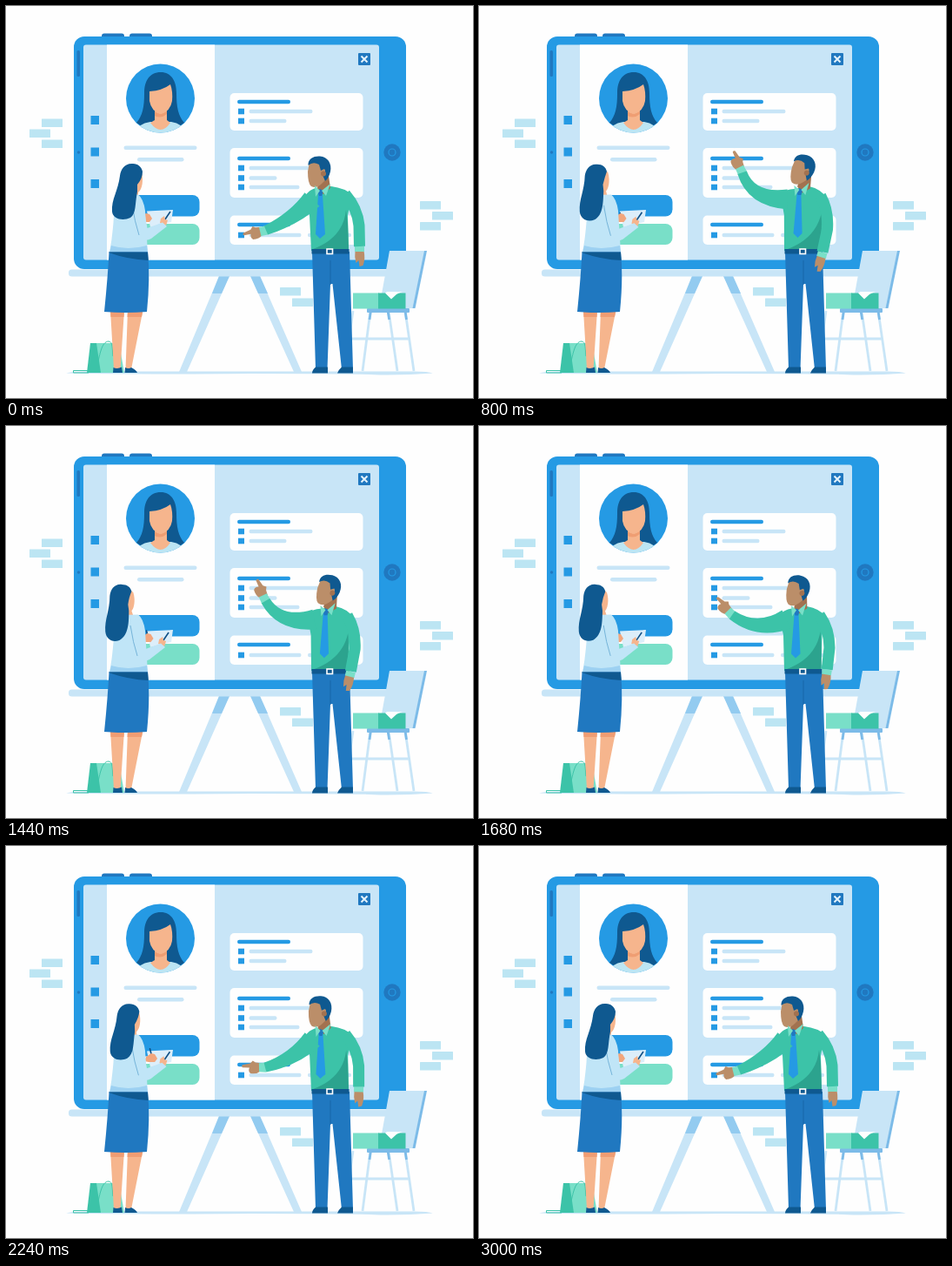
These frames come from a looping animation (537 px wide and 450 px high, 3040 ms). An HTML page:

```html
<!DOCTYPE html>
<html lang="en">
<head>
<meta charset="utf-8">
<title>Presentation</title>
<style>
html, body { margin: 0; width: 100%; height: 100%; overflow: hidden; background: #fefefe; }
svg { display: block; width: 537px; height: 450px; }
.blue { fill: #259ae4; } .mid { fill: #2078c0; } .navy { fill: #0f5990; }
.ice { fill: #c8e5f7; } .sky { fill: #7cbbe8; } .white { fill: #fefefe; }
.aqua { fill: #bce5f3; } .mint { fill: #79dfc8; } .green { fill: #3cc3a8; }
.shade { fill: #2ca38e; } .peach { fill: #f6b58d; } .tan { fill: #bb8e69; } .brown { fill: #a27250; }
.line { fill: none; }
</style>
</head>
<body>
<svg viewBox="0 0 537 450">
  <clipPath id="round"><circle cx="177.5" cy="106" r="39.5"/></clipPath>

  <!-- tablet -->
  <g class="mid">
    <rect x="110" y="31.500" width="26" height="9" rx="3"/>
    <rect x="142" y="31.500" width="26" height="9" rx="3"/>
  </g>
  <rect class="blue" x="78" y="35" width="382" height="267" rx="12"/>
  <rect class="ice" x="89" y="44.500" width="340" height="247" rx="3"/>
  <rect class="white" x="116" y="44.500" width="124" height="247"/>
  <rect class="mid" x="81.500" y="51" width="3.500" height="30" rx="1.500"/>
  <circle class="mid" cx="83.500" cy="168" r="1.700"/>
  <circle class="mid" cx="444" cy="168" r="9.700"/>
  <circle class="line" cx="444" cy="168" r="4" stroke="#259ae4" stroke-width="1.200"/>
  <path class="blue" d="M97.500,126h9.500v10h-9.500zM97.500,162.500h9.500v10h-9.500zM97.500,199h9.500v10h-9.500z"/>
  <rect class="mid" x="405" y="54" width="14" height="14" rx="1"/>
  <path d="M408.500,57.500l7,7m0,-7l-7,7" stroke="#e4f3fc" stroke-width="2"/>

  <!-- profile -->
  <circle class="blue" cx="177.500" cy="106" r="39.500"/>
  <g clip-path="url(#round)">
    <path class="navy" d="M178,76C165,76 159,86 159,100C159,116 157,126 150,134Q160,142 178,142Q196,142 205,134C198,126 196,116 196,100C196,86 190,76 178,76Z"/>
    <path class="aqua" d="M148,147Q151,135 166,133L190,133Q204,135 207,147Z"/>
    <path class="peach" d="M171,118H185V131L189,134Q178,150 166,134L171,131Z"/>
    <path d="M171,121Q178,127 185,120V124Q178,130 171,126Z" fill="#ef9e73"/>
    <path class="peach" d="M165,98Q180,97 189,90Q192,98 191,109Q189,121 178,124Q167,121 165,109Z"/>
  </g>
  <g class="ice">
    <rect x="135.500" y="160.500" width="84" height="4.500" rx="2.200"/>
    <rect x="151" y="174" width="53.500" height="4.500" rx="2.200"/>
  </g>
  <rect class="blue" x="132" y="217" width="90.500" height="24.500" rx="8"/>
  <rect class="mint" x="132" y="250" width="90.500" height="24" rx="8"/>
  <g id="cards"></g>

  <g id="bricks" class="aqua"></g>

  <!-- easel -->
  <path class="ice" d="M245,310h12L208,420h-9zM281,310h11L340,420h-9z"/>
  <path fill="#93cbf0" d="M245,310h12L248,330h-11zM281,310h11L301,330h-11z"/>
  <rect class="ice" x="72" y="302.500" width="394" height="8" rx="3.500"/>
  <path class="ice" d="M69,421.500Q75,419.500 90,419.500H470Q485,419.500 491,421.500Q460,424 430,423.500Q410,422 280,422Q150,423 69,421.500Z"/>

  <!-- chair -->
  <g class="line" stroke="#c8e5f7" stroke-width="2.800">
    <path d="M399,350L389,419M419,350L410,419M440,350L450,419M459,350L469,419M396,382H464"/>
    <path d="M419.500,350l-1.500,10M439,350l1.700,10M459,350l1.500,10" stroke="#7cbbe8"/>
  </g>
  <path class="sky" d="M478,281h6L470.500,347h-6z"/>
  <path class="ice" d="M441,281H481L467.500,347H429z"/>
  <rect class="sky" x="415" y="347" width="49" height="5" rx="1"/>
  <rect class="mint" x="399" y="329.500" width="30" height="18"/>
  <rect class="green" x="428" y="329.500" width="31.500" height="18"/>
  <path class="white" d="M436,329.500L443,336.500L449,331L452,329.500L456,328H438z"/>

  <!-- bag -->
  <path class="green" d="M97,387H119L111,421H93z"/>
  <path class="mint" d="M104,387H130L136,421H109z"/>
  <path class="line" d="M105,412C108,400 110,385 118,385C123,385 122,394 123,402M95,418.500H77.500V421H95" stroke="#3cc3a8" stroke-width="1"/>

  <!-- woman -->
  <path class="peach" d="M120,349H136L131.500,417H124zM140,349H157.500L144,417H137.500z"/>
  <path fill="#f09d73" d="M120,349H136L135.500,357H120.500zM140,349H157.500L156,357H139.500z"/>
  <path class="navy" d="M123.500,415Q128,417 133,414.500L134,421H123zM137,415Q141,417 144,415Q150,418 151,421H136.500z"/>
  <path id="neck" class="peach"/>
  <path fill="#dceefa" d="M162,235.500L192,234L190,248L166,254z"/>
  <g id="writer">
    <path id="pen" stroke="#0f4f85" stroke-width="1.600" stroke-linecap="round"/>
    <path fill="#f2a67d" d="M-7,-1L-1,-5L3,-4L6,1L3,5L-4,5L-9,4z"/>
  </g>
  <path fill="#c0e5f7" d="M134,217L152,216.500Q158,221 160,235L163,283H119Q123,262 124,240Z"/>
  <path fill="#9dd1f2" d="M121,275Q140,281 162,275L163,283H119z"/>
  <path class="mid" d="M118.500,282.500H163Q166,312 162,351Q137,353 113,351Q117,312 118.500,282.500Z"/>
  <path class="navy" d="M118.500,282.500H163L163.700,292Q140,291 118,283z"/>
  <g id="near">
    <path class="line" d="M181.500,247L189,236" stroke="#0f4f85" stroke-width="1.600"/>
    <path class="peach" d="M177,249L178,244L182,241L183,245L186,246L184,252z"/>
    <path fill="#c0e5f7" d="M146,220Q156,217 159,235L162.500,255L180,248.500L185,253L167,267Q160,271 156,266Q149,253 146,235Z"/>
    <path class="line" d="M145,228Q148,248 153,263" stroke="#75b4d9"/>
  </g>
  <path id="face" class="peach"/>
  <path id="hair" class="navy"/>

  <!-- man -->
  <path class="mid" d="M352,282H395L399,417H386L375.500,319H373L369.500,417H356z"/>
  <path class="line" d="M373,292V320" stroke="#1766a8"/>
  <path class="navy" d="M356,414.500H370V421.500H352Q352,418 356,414.500ZM386,414.500H399V421.500H381Q382,418 386,414.500Z"/>
  <path id="shirt" class="green"/>
  <path id="fold" class="shade"/>
  <rect class="navy" x="351.500" y="279" width="43" height="5.500"/>
  <rect x="369" y="279" width="6.500" height="5.500" fill="#0f5990" stroke="#fefefe" stroke-width="1.600"/>
  <g id="rest">
    <path class="tan" d="M-5,1H5Q7,10 4,18L0,19L-1,12L-4,15Q-6,8 -5,1Z"/>
    <rect class="mint" x="-5.500" y="-4" width="11" height="6"/>
  </g>
  <path id="sleeve" class="line" stroke="#3cc3a8" stroke-width="13" stroke-linejoin="round"/>
  <g id="head">
    <path class="brown" d="M359,198L371,195L373,209L365,216L358,210z"/>
    <path class="tan" d="M349,179L347,190Q347,204 351,207Q357,210 363,204L370,197L370,184L362,176Z"/>
    <path class="navy" d="M347.500,183C347,175 354,172 361,172.500C370,173 375,181 373,190Q371,198 367,201L364,194Q369,190 366,187L362,189L360,182Q353,178 347.500,183Z"/>
    <circle class="brown" cx="365" cy="192.500" r="3"/>
  </g>
  <path id="tie" class="blue"/>
  <path id="knot" class="mid"/>
  <path id="collar" class="mint"/>
  <g id="hand">
    <path class="tan" d="M5,-4Q10,-8 17,-6.500Q20,-4 18,0L26,.5Q27.500,2 26,3.500L17,5L14,8L11,6L5,5Z"/>
    <path class="mint" d="M-1,-5.500L7,-5L7,5L-1,5.500z"/>
  </g>
  <path id="arm" class="green"/>
</svg>
<script>
const $ = id => document.getElementById(id);
const set = (id, name, value) => $(id).setAttribute(name, value);
const LOOP = 3040, STEP = 40;

// Cards: top, height, title y, then rows of [y, bar width]
const box = (x, y, w, h, cls, r) => `<rect class="${cls}" x="${x}" y="${y}" width="${w}" height="${h}" rx="${r}"/>`;
$('cards').innerHTML = [
  [100, 43, 110, [[121, 73], [132, 43]]],
  [163, 57, 175, [[186, 84], [197.5, 32], [208, 58]]],
  [240.5, 33.5, 251, [[263, 60]]]
].map(([y, h, title, rows]) =>
  box(257.5, y, 153, h, 'white', 5) + box(266, title - 2.3, 61, 4.5, 'blue', 2.2) +
  rows.map(([v, w]) => box(267, v - 3.3, 7, 6.6, 'blue', 0) + box(279.5, v - 2.2, w, 4.4, 'ice', 2.2)).join('')
).join('') + box(347, 260.8, 50, 4.4, 'ice', 2.2);

$('bricks').innerHTML = [[41, 129.5], [27, 141.5], [41, 153.5], [476, 224], [490, 236], [476, 248], [315, 323], [329, 335.5]]
  .map(([x, y]) => box(x, y, 24, 9.5, '', .5)).join('');

// time, elbow x y, wrist x y, hand angle, man lean, woman lean, writing hand x, pen length
const keys = [
  [0, 332, 244, 299, 257.5, 166, 0, 0, 162, 0],
  [40, 332, 244, 299, 257.5, 166, 0, 0, 162, 0],
  [480, 322, 234, 293, 215, 198, .55, .08, 165, 4],
  [960, 311, 220, 306, 186.5, 256, 1, 1, 163, 6],
  [1200, 312, 222, 306, 190, 255, 1, 1, 167, 16],
  [1680, 320, 238, 291, 217, 225, .5, .9, 160, 0],
  [2000, 328, 247, 296, 247, 199, .2, .65, 165, 4],
  [2500, 332, 244, 299, 257.5, 166, 0, 0, 171, 15],
  [2600, 332, 244, 299, 257.5, 166, 0, 0, 172, 15],
  [3000, 332, 244, 299, 257.5, 166, 0, 0, 162, 0],
  [3040, 332, 244, 299, 257.5, 166, 0, 0, 162, 0]
];

// Monotone cubic interpolation of one channel
const slope = (i, c) => i < 0 || i > keys.length - 2 ? 0 : (keys[i + 1][c] - keys[i][c]) / (keys[i + 1][0] - keys[i][0]);
function tangent(i, c) {
  const a = slope(i - 1, c), b = slope(i, c);
  return a * b > 0 ? 2 * a * b / (a + b) : 0;
}
function channel(t, c) {
  let i = 0;
  while (i < keys.length - 2 && t >= keys[i + 1][0]) i++;
  const d = keys[i + 1][0] - keys[i][0], u = (t - keys[i][0]) / d, v = 1 - u;
  return v * v * ((1 + 2 * u) * keys[i][c] + u * d * tangent(i, c)) +
    u * u * ((3 - 2 * u) * keys[i + 1][c] - v * d * tangent(i + 1, c));
}

// Pairs of outlines with equal structure, blended by lean
const man = {
  shirt: ['M356,209C350,211 346,214 343,220L349,240L351,281L394,281L393,240L398,217Q390,209 374,207Z',
          'M363,210C357,210 351,212 347,215L351,240L351,281L393,281L396,240L401,222Q394,210 380,207Z'],
  fold: ['M391,234Q388,266 353,279L394,279L393,250Z', 'M394,238Q387,267 355,279L393,279L394,250Z'],
  sleeve: ['M390,216Q404,232 406,252L406.500,276', 'M393,218Q402,235 400,257L394,283'],
  tie: ['M358,212L364,211L364,217L367,262L361,267L356,262L359,217Z', 'M366,212L372,211L371,217L372,261L367,266L362,261L366,217Z'],
  knot: ['M358,212L361,210L365,212L363,218L360,218Z', 'M366,212L369,209L373,211L371,217L367,217Z'],
  collar: ['M355,206L361,212L356,219ZM373,204L363,212L368,218Z', 'M363,206L369,211L364,218ZM380,203L371,211L376,217Z']
};
const woman = {
  hair: ['M146,181C137,180 132,187 131,195C129,212 121,222 122,236C123,245 135,247 143,243C150,238 148,228 151,213L151,205Q157,198 157,190C156,185 152,181 146,181Z',
         'M133,182C124,181 120,188 119,195C119,212 113,222 114,236C115,245 122,249 130,246C141,240 141,225 141,212L140,205Q141,196 144,190C143,185 139,182 133,182Z'],
  face: ['M152,187L156,191C158,200 157,210 152,214Q149,214 149,205Z', 'M140,186L146,191C149,200 147,211 143,213Q138,213 137,205Z'],
  neck: ['M142,205L152,209L152,220L138,220Z', 'M134,205L143,209L147,220L136,220Z']
};
const mix = (a, b, k) => a + (b - a) * k;
function blend([a, b], k) {
  const end = b.match(/[\d.]+/g);
  let i = 0;
  return a.replace(/[\d.]+/g, n => mix(+n, +end[i++], k).toFixed(2));
}

// Tapered curved limb from shoulder s by control e to wrist w
function limb(s, e, w, r0, r1) {
  const off = (p, a, b, r) => {
    const dx = b[0] - a[0], dy = b[1] - a[1], l = Math.hypot(dx, dy);
    return [p[0] - dy / l * r, p[1] + dx / l * r];
  };
  const side = k => [off(s, s, e, r0 * k), off(e, s, w, (r0 + r1) / 2 * k), off(w, e, w, r1 * k)];
  const a = side(1), b = side(-1);
  return `M${a[0]}Q${a[1]} ${a[2]}L${b[2]}Q${b[1]} ${b[0]}Z`;
}

function draw(now) {
  const t = Math.floor(now % LOOP / STEP) * STEP;
  const [ex, ey, wx, wy, angle, p, q, hx, pen] = keys[0].slice(1).map((_, i) => channel(t, i + 1));
  for (const id in man) set(id, 'd', blend(man[id], p));
  for (const id in woman) set(id, 'd', blend(woman[id], q));
  set('head', 'transform', `translate(${9.5 * p} ${-p}) rotate(${14 * p} 366 206)`);
  set('rest', 'transform', `translate(${mix(406.5, 393, p)} ${mix(280, 287, p)}) rotate(${18 * p})`);
  set('arm', 'd', limb([mix(352, 355, p), 222], [ex, ey], [wx, wy], 11.5, 5.5));
  set('hand', 'transform', `translate(${wx} ${wy}) rotate(${angle})`);
  set('near', 'transform', `translate(${-2 * q} ${q})`);
  set('writer', 'transform', `translate(${hx} 243)`);
  set('pen', 'd', `M0,0L${-pen / 4},${-pen}`);
}
function tick() {
  draw(performance.now());
  requestAnimationFrame(tick);
}
tick();
</script>
</body>
</html>
```
